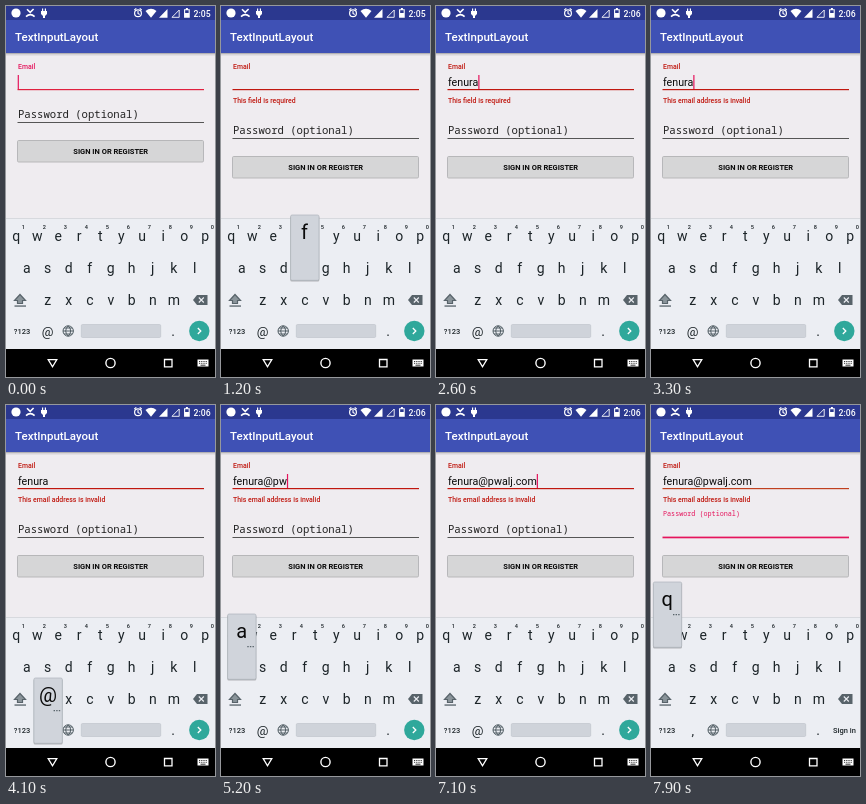
An HTML page for the animation above (8000 ms loop, 209 by 371 pixels).

```html
<!DOCTYPE html>
<html lang="en">
<head>
<meta charset="utf-8">
<title>Sign-in form</title>
<style>
html, body { margin: 0; width: 100%; height: 100%; overflow: hidden; background: #efecf0; }
svg { display: block; width: 100%; height: 100%; font-family: Roboto, sans-serif; }
.mono { font-family: "Noto Sans Mono", monospace; }
.mid { text-anchor: middle; }
.strong { font-weight: 500; }
</style>
</head>
<body>
<svg id="stage" viewBox="0 0 209 371"></svg>
<script>
const LOOP = 8000;
const PINK = '#e5145c', RED = '#c0170f', INK = '#0a0a0a', SLATE = '#1c2428', ICON = '#58636a';
const ADDRESS = 'fenura@pwalj.com';
const PRESSES = [1150, 1340, 1520, 1700, 1880, 2100, 4050, 4500, 4850, 5150,
                 5400, 5620, 5880, 6150, 6450, 6700];
const PASSWORD_KEY = 7850;
const INSERT_DELAY = 100, POPUP_TIME = 200;
const FIRST_SUBMIT = 500, SECOND_SUBMIT = 3300, MINUTE = 1900, NEXT_FIELD = 7300;

const stage = document.getElementById('stage');

function el(name, attrs, parent = stage) {
  const node = document.createElementNS('http://www.w3.org/2000/svg', name);
  set(node, attrs);
  parent.appendChild(node);
  return node;
}
function set(node, attrs) {
  for (const key in attrs) node.setAttribute(key, attrs[key]);
}
function rect(x, y, width, height, fill, extra = {}, parent) {
  return el('rect', { x, y, width, height, fill, ...extra }, parent);
}
function path(d, fill, extra = {}, parent) {
  return el('path', { d, fill, ...extra }, parent);
}
function label(content, x, y, size, fill, extra = {}, parent) {
  const node = el('text', { x, y, 'font-size': size, fill, ...extra }, parent);
  node.textContent = content;
  return node;
}
function outline(d, stroke, width, extra) {
  return path(d, 'none', { stroke, 'stroke-width': width, ...extra });
}
const centred = { class: 'mid' };
const strong = { class: 'strong' };
const strongCentred = { class: 'mid strong' };

// Page and app bar
rect(0, 0, 209, 371, '#efecf0');
rect(0, 47, 209, 1, '#000', { opacity: 0.25 });
rect(0, 48, 209, 1.5, '#000', { opacity: 0.1 });
rect(0, 14, 209, 33, '#3f51b5');
label('TextInputLayout', 9, 35.3, 11.5, '#fff', strong);

// Status bar
rect(0, 0, 209, 14, '#2b388f');
el('circle', { cx: 10, cy: 7, r: 4.6, fill: '#fff' });
outline('M20 10.6q4.3-4 8.6 0M21 3.2l3.2 3.2l3.4-3.4', '#fff', 1.6);
path('M35 5h6v3l-2 2v2h-2v-2l-2-2zM36 2.5h1.2v3h-1.2zM38.8 2.5h1.2v3h-1.2z', '#fff');
el('circle', { cx: 132, cy: 7.3, r: 3.4, fill: 'none', stroke: '#fff', 'stroke-width': 1.2 });
outline('M132 5v2.5l1.7 1M128.3 4l2-1.6M135.7 4l-2-1.6', '#fff', 1.1);
path('M139.5 5q5.5-4.5 11 0l-5.5 6.8z', '#fff');
path('M153 11.7h8.5v-8.7z', '#fff');
outline('M166 11.3h7.2v-7.3z', '#fff', 0.9);
outline('M178.6 3.7h4.6v7.6h-4.6zM179.9 2.6h2', '#fff', 1.1);
rect(179, 7, 4, 4, '#fff');
const clock = label('', 187.5, 10.7, 8.7, '#fff', strong);

// Email field
const emailLabel = label('Email', 12, 62.8, 6.9, PINK, strong);
const emailText = label('', 12, 80, 10.7, INK);
const emailLine = rect(11.5, 83, 186.5, 1.2, RED);
const errorText = label('', 12, 96.6, 6.9, RED, strong);

// Password field and button, moved down together by the error line
const lower = el('g', {});
const passwordLabel = label('Password (optional)', 12, 111.5, 10.6, '#222', { class: 'mono' }, lower);
const passwordLine = rect(11.5, 116, 186.5, 1, '#555', {}, lower);
rect(11.5, 134.5, 186, 21.5, '#d6d6d7',
  { rx: 1.2, stroke: '#b3b3b5', 'stroke-width': 0.9 }, lower);
label('SIGN IN OR REGISTER', 104.7, 147.8, 7.5, INK, { class: 'mid', 'font-weight': 700 }, lower);

const caret = rect(12, 69, 1.2, 14, PINK);

// Keyboard
rect(0, 212, 209, 131, '#eceef3');
rect(0, 212, 209, 0.8, '#d3d5da');
const keys = {};
function keyRow(chars, left, y) {
  [...chars].forEach((char, i) => {
    const x = left + i * 21;
    keys[char] = { x, y };
    label(char, x, y + 4.5, 14, SLATE, centred);
  });
}
keyRow('qwertyuiop', 10.2, 230);
keyRow('asdfghjkl', 20.7, 262);
keyRow('zxcvbnm', 41.8, 294);
[...'1234567890'].forEach((digit, i) =>
  label(digit, 17.3 + i * 21, 223.2, 5.6, SLATE, strongCentred));
keys['@'] = { x: 42, y: 326 };
keys['.'] = { x: 167, y: 326 };

outline('M14 288.5l5.5 6h-3v3h-5v-3h-3z', ICON, 1.2, { fill: '#8a949a' });
rect(8.5, 299.4, 11.5, 1.3, ICON);
path('M187 294l4-5h10.5v10h-10.5z', ICON);
outline('M192.8 291.5l5 5m0-5l-5 5', '#eceef3', 1.1);
label('?123', 16, 328.4, 7.5, SLATE, strongCentred);
const atKey = label('@', 41.7, 329.6, 13, SLATE, centred);
label('.', 167, 330, 14, SLATE, centred);
outline('M57 325a5.2 5.2 0 1 0 10.4 0a5.2 5.2 0 1 0-10.4 0h10.4M58 322h8.4M58 328h8.4' +
  'M62.2 319.8q-5 5.2 0 10.4q5-5.2 0-10.4', '#455259', 0.9);
rect(75.3, 318.5, 79.4, 13, '#cfd3da', { rx: 1.2, stroke: '#bcc1c8', 'stroke-width': 0.6 });

const enterKey = el('g', {});
el('circle', { cx: 193.3, cy: 325, r: 10.2, fill: '#2fa89b' }, enterKey);
path('M191.8 322l3 3l-3 3', 'none', { stroke: '#fff', 'stroke-width': 1.3 }, enterKey);
const signInKey = label('Sign in', 193.5, 328, 7.5, SLATE, strongCentred);

// Navigation bar
rect(0, 343, 209, 28, '#000');
outline('M42.2 353.6h8.6l-4.3 7.2z', '#fff', 1.3);
el('circle', { cx: 104.5, cy: 357, r: 4.6, fill: 'none', stroke: '#fff', 'stroke-width': 1.4 });
outline('M158.5 353.5h7.5v7.3h-7.5z', '#fff', 1.3);
path('M191.5 353.5h11v7h-11z', '#fff');
outline('M193 355.5h8M193 357.3h8', '#000', 0.8, { 'stroke-dasharray': '1 .8' });
outline('M194.5 359.2h5', '#000', 0.8);

// Key preview
const popup = el('g', {});
rect(0, 1, 29, 65.5, '#000', { rx: 1.5, opacity: 0.25 }, popup);
rect(0.3, 0, 28.4, 65.3, '#d0d4db',
  { rx: 1.5, stroke: '#aeb4bb', 'stroke-width': 0.7 }, popup);
const popupChar = label('', 14.3, 23.6, 20, INK, centred, popup);
const popupDots = path('M20 32h1.4v1.2h-1.4zM22.6 32h1.4v1.2h-1.4zM25.2 32h1.4v1.2h-1.4z', ICON, {}, popup);

const show = (node, visible) => set(node, { visibility: visible ? 'visible' : 'hidden' });

function heldKey(time) {
  const isHeld = press => time >= press && time < press + POPUP_TIME;
  if (isHeld(PASSWORD_KEY)) return 'q';
  return ADDRESS[PRESSES.findLastIndex(isHeld)];
}

function drawPopup(char) {
  show(popup, char);
  if (!char) return;
  const { x, y } = keys[char];
  const left = Math.max(2, Math.min(178, x - 14.4));
  set(popup, { transform: `translate(${left} ${y - 53})` });
  popupChar.textContent = char;
  popupDots.setAttribute('opacity', 'aceinosuq@.'.includes(char) ? 1 : 0);
}

function draw(time) {
  const typed = PRESSES.filter(press => time >= press + INSERT_DELAY).length;
  const failed = time >= FIRST_SUBMIT;
  const onPassword = time >= NEXT_FIELD;

  clock.textContent = time < MINUTE ? '2:05' : '2:06';
  emailText.textContent = ADDRESS.slice(0, typed);
  errorText.textContent = !failed ? '' :
    time < SECOND_SUBMIT ? 'This field is required' : 'This email address is invalid';
  set(errorText, { opacity: Math.min(1, Math.max(0, (time - FIRST_SUBMIT) / 200)) });
  set(emailLabel, { fill: failed ? RED : PINK });
  set(emailLine, { fill: !failed ? '#e0203f' : onPassword ? '#c0401f' : RED });
  set(lower, { transform: `translate(0 ${failed ? 16 : 0})` });

  const progress = Math.min(1, Math.max(0, (time - NEXT_FIELD) / 200));
  const lift = 1 - (1 - progress) ** 3;
  set(passwordLabel, {
    y: 111.5 - 17 * lift,
    'font-size': 10.6 - 3.85 * lift,
    fill: onPassword ? PINK : '#222'
  });
  set(passwordLine, {
    y: onPassword ? 115.6 : 116,
    height: onPassword ? 1.7 : 1,
    fill: onPassword ? PINK : '#555'
  });

  const lastInsert = typed ? PRESSES[typed - 1] + INSERT_DELAY : 0;
  const blinkStart = onPassword ? NEXT_FIELD : typed ? lastInsert : failed ? FIRST_SUBMIT : 0;
  show(caret, (time - blinkStart) % 1000 < 500);
  set(caret, {
    x: onPassword || !typed ? 11.7 : 12 + emailText.getComputedTextLength(),
    y: onPassword ? 117 : 69
  });

  atKey.textContent = onPassword ? ',' : '@';
  show(enterKey, !onPassword);
  show(signInKey, onPassword);
  drawPopup(heldKey(time));
}

const start = performance.now();
function tick() {
  draw((performance.now() - start) % LOOP);
  requestAnimationFrame(tick);
}
tick();
</script>
</body>
</html>
```
